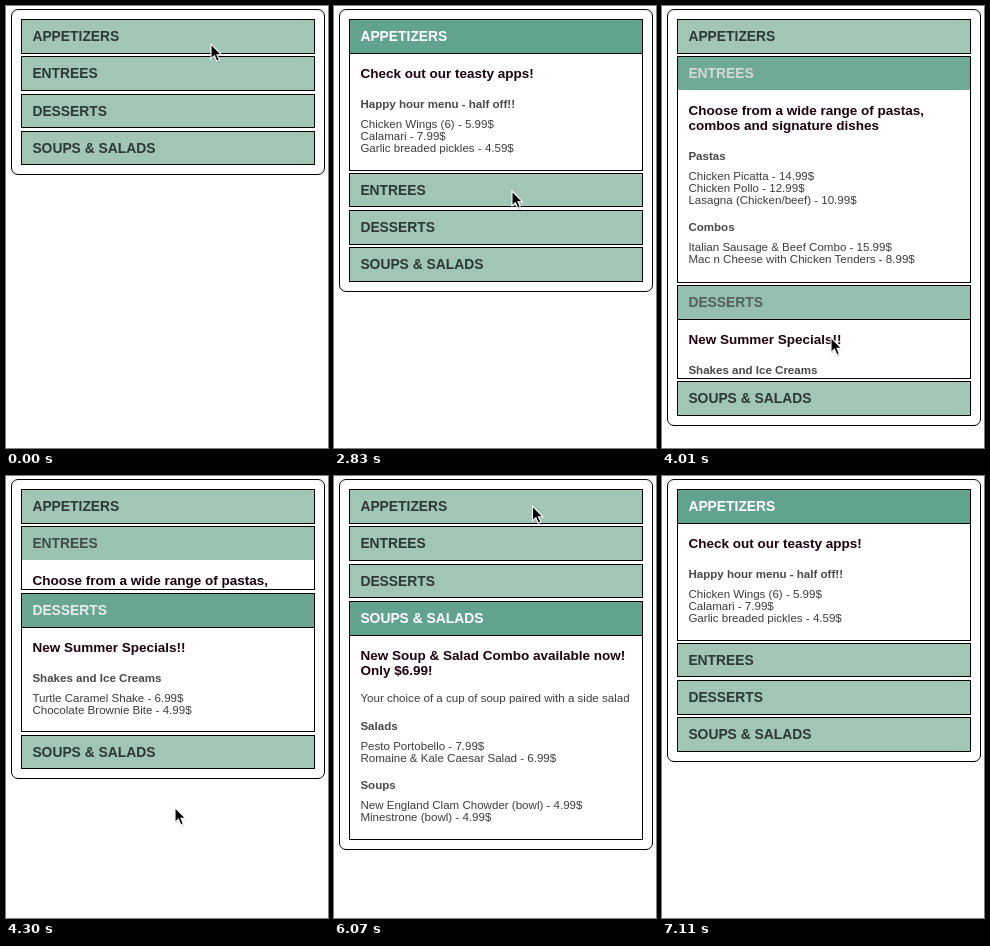
These frames come from a looping animation (322x442 px, 8.01 s). An HTML page:

```html
<!DOCTYPE html>
<html lang="en">
<head>
<meta charset="utf-8">
<title>Menu accordion</title>
<style>
  html, body { margin: 0; width: 100%; height: 100%; overflow: hidden; background: #fff; }
  body { position: relative; font-family: "Liberation Sans", Arial, sans-serif; }
  div, svg { position: absolute; box-sizing: border-box; }
  #box { left: 5px; top: 3px; width: 314px; border: 1px solid #000; border-radius: 7px; }
  .item { left: 15px; width: 294px; border: 1px solid #000; background: #fff; overflow: hidden; }
  .head { left: 0; top: 0; width: 100%; height: 33px; padding-left: 10.4px; font: bold 13.85px/33px "Liberation Sans", Arial, sans-serif; }
  .head.on { height: 34px; border-bottom: 1px solid #000; }
  .row { left: 10.4px; white-space: nowrap; line-height: 12px; font-size: 11.55px; color: #3c3c3c; }
  .t { font-size: 13.5px; line-height: 16px; font-weight: bold; color: #1c0010; }
  .s { font-weight: bold; color: #484848; }
  #cursor { left: 0; top: 0; overflow: visible; width: 1px; height: 1px; }
</style>
</head>
<body>
<div id="box"></div>
<svg id="cursor">
  <g id="arrow">
    <path d="M0 0V15L3.4 11.8L5.8 17.3L8.4 16.2L6 10.9H10.6Z" transform="translate(.6 1.2)" fill="#000" opacity=".22"/>
    <path d="M0 0V15L3.4 11.8L5.8 17.3L8.4 16.2L6 10.9H10.6Z" fill="#000" stroke="#fff" stroke-width="1.1"/>
  </g>
  <path id="beam" d="M-3 -7.5Q0 -7.5 0 -5.5V5.5Q0 7.5 -3 7.5M3 -7.5Q0 -7.5 0 -5.5M0 5.5Q0 7.5 3 7.5M-1.5 2.5H1.5" fill="none" stroke="#222" stroke-width="1.1"/>
</svg>
<script>
const LOOP = 8010, TOP = 13, PITCH = 37.25, HEAD = 34.5, MAX = 300;

// Rows: t title, s subheading, p paragraph, i dish
const menu = [
  { name: 'APPETIZERS', size: 116.7, rows: [
    't Check out our teasty apps!', 's Happy hour menu - half off!!',
    'i Chicken Wings (6) - 5.99$', 'i Calamari - 7.99$', 'i Garlic breaded pickles - 4.59$'] },
  { name: 'ENTREES', size: 191.7, rows: [
    't Choose from a wide range of pastas,', 't combos and signature dishes', 's Pastas',
    'i Chicken Picatta - 14.99$', 'i Chicken Pollo - 12.99$', 'i Lasagna (Chicken/beef) - 10.99$', 's Combos',
    'i Italian Sausage & Beef Combo - 15.99$', 'i Mac n Cheese with Chicken Tenders - 8.99$'] },
  { name: 'DESSERTS', size: 104.1, rows: [
    't New Summer Specials!!', 's Shakes and Ice Creams',
    'i Turtle Caramel Shake - 6.99$', 'i Chocolate Brownie Bite - 4.99$'] },
  { name: 'SOUPS & SALADS', size: 204.4, rows: [
    't New Soup & Salad Combo available now!', 't Only $6.99!',
    'p Your choice of a cup of soup paired with a side salad', 's Salads',
    'i Pesto Portobello - 7.99$', 'i Romaine & Kale Caesar Salad - 6.99$', 's Soups',
    'i New England Clam Chowder (bowl) - 4.99$', 'i Minestrone (bowl) - 4.99$'] }
];
const gaps = { tt: 15, ts: 29.5, tp: 27, ps: 27.7, si: 20, ii: 12, is: 27 };

// Start, duration, closing item, opening item
const moves = [
  [1713, 550, -1, 0], [2940, 500, 0, 1], [3914, 618, 1, 2], [4960, 550, 2, 3], [6277, 550, 3, 0]
];

// Time, x, y, shape
const pointer = [
  [0, 205, 38, 'arrow'], [1200, 205, 37, 'arrow'], [2380, 201, 65, 'arrow'], [2530, 192, 115, 'arrow'],
  [2680, 182, 165, 'arrow'], [2830, 178, 185, 'arrow'], [3120, 177, 205, 'arrow'], [3270, 177, 267, 'beam'],
  [3420, 184, 275, 'beam'], [3710, 167.5, 293, 'arrow'], [4010, 169, 331.5, 'arrow'], [4890, 172, 276, 'arrow'],
  [5620, 180, 185, 'arrow'], [5770, 190, 90, 'arrow'], [5920, 198, 31, 'arrow'], [6070, 198.5, 30, 'arrow'],
  [6960, 222, 130, 'arrow'], [7110, 0, 0, 'none']
];

// Evenly spaced steps on a 10 ms clock
const span = (a, b, n) => Array.from({ length: n }, (_, i) => Math.round((a + (b - a) * i / (n - 1)) / 10) * 10);
const ticks = [0, 1200, ...span(1790, 2830, 8), ...span(2980, 3420, 4), 3710,
  ...span(4010, 4590, 5), ...span(4890, 5920, 8), 6070, ...span(6370, 7110, 6)];

const $ = id => document.getElementById(id);
const add = (parent, cls, text = '') => {
  const el = document.createElement('div');
  el.className = cls;
  el.textContent = text;
  parent.append(el);
  return el;
};

for (const m of menu) {
  m.el = add(document.body, 'item');
  m.head = add(m.el, 'head', m.name);
  let y = 55.3 - 1, last = '';
  for (const row of m.rows) {
    const kind = row[0];
    y += gaps[last + kind] || 0;
    add(m.el, 'row ' + kind, row.slice(2)).style.top = y - (kind === 't' ? 8 : 6) + 'px';
    last = kind;
  }
}
document.body.append($('cursor'));

// cubic-bezier(.25, .1, .25, 1)
function ease(x) {
  if (x <= 0) return 0;
  if (x >= 1) return 1;
  let lo = 0, hi = 1, s;
  for (let i = 0; i < 24; i++) {
    s = (lo + hi) / 2;
    if (.75 * s * (1 - s) + s ** 3 < x) lo = s; else hi = s;
  }
  const y = .3 * s * (1 - s) ** 2 + 3 * s * s * (1 - s) + s ** 3;
  return y > .99 ? 1 : y;
}

const mix = (a, b, p) => `rgb(${a.map((v, i) => Math.round(v + (b[i] - v) * p))})`;

function draw(time) {
  const t = ticks.findLast(k => k <= time);
  const open = [0, 0, 0, 0];
  let active = -1;
  for (const [start, dur, from, to] of moves) {
    if (t < start) break;
    const p = ease((t - start) / dur);
    if (from >= 0) open[from] = 1 - p;
    open[to] = p;
    active = to;
  }

  let y = TOP;
  menu.forEach((m, i) => {
    const p = open[i], extra = Math.min(m.size, MAX * p);
    const top = Math.round(y), end = Math.round(y + HEAD + extra + (extra === m.size ? .3 : 0));
    m.el.style.top = top + 'px';
    m.el.style.height = end - top + 'px';
    m.head.className = i === active ? 'head on' : 'head';
    m.head.style.background = mix([161, 198, 181], [98, 163, 143], p);
    m.head.style.color = mix([44, 56, 52], [255, 255, 255], p);
    y += PITCH + extra;
  });
  $('box').style.height = Math.round(y - PITCH + HEAD + 10) - 3 + 'px';

  const [, cx, cy, shape] = pointer.findLast(k => k[0] <= t);
  $('cursor').style.transform = `translate(${cx}px, ${cy}px)`;
  for (const id of ['arrow', 'beam']) $(id).style.display = id === shape ? '' : 'none';
}

const begin = performance.now();
function frame() {
  draw((performance.now() - begin) % LOOP);
  requestAnimationFrame(frame);
}
frame();
</script>
</body>
</html>
```
